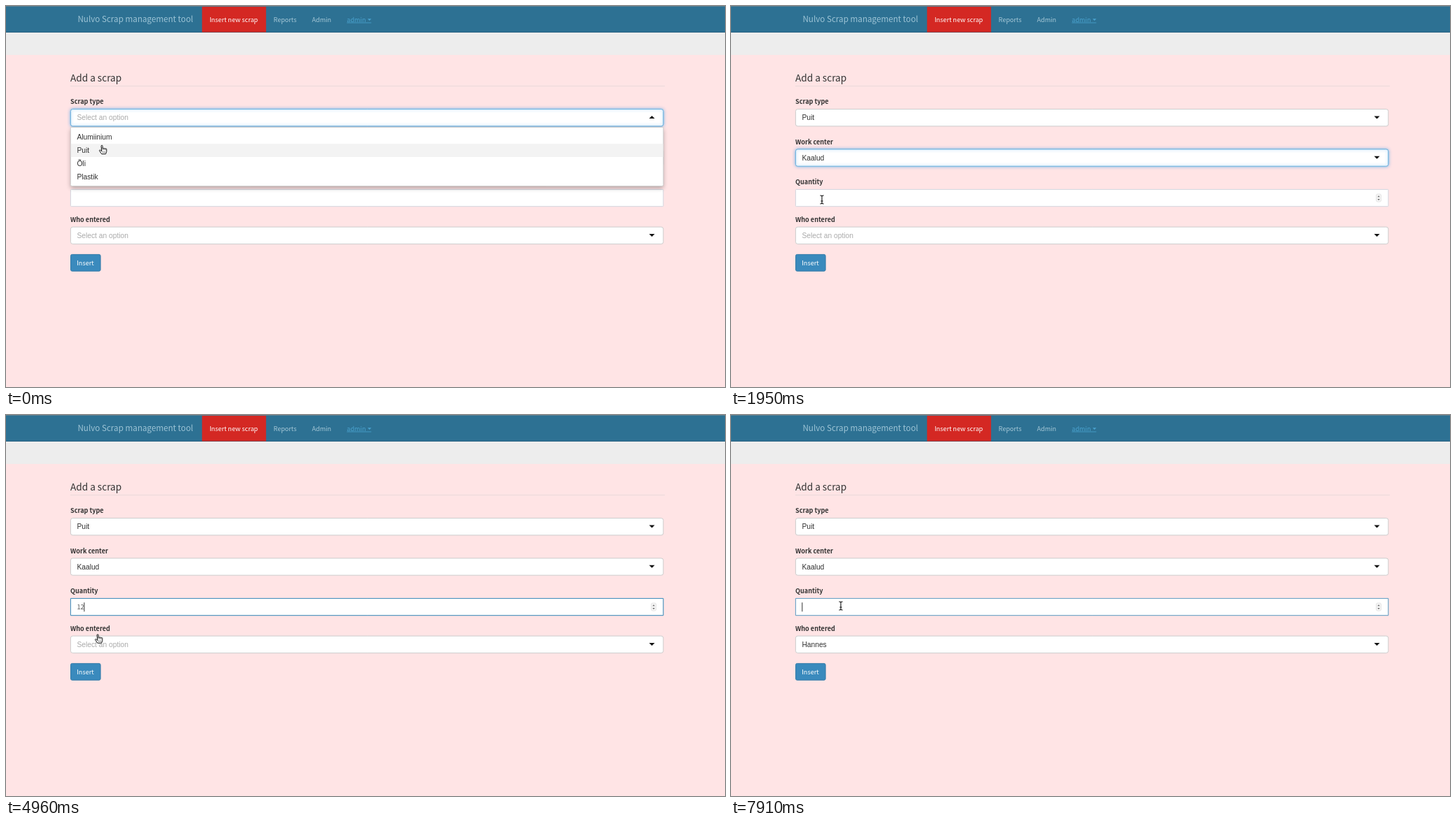
Animation, 1028 px wide and 545 px high, one loop 8 s. Source, as an HTML page with a canvas:

```html
<!DOCTYPE html>
<html lang="en">
<head>
<meta charset="utf-8">
<title>Add a scrap</title>
<style>
html, body { margin: 0; width: 100%; height: 100%; overflow: hidden; background: #ffe4e5; }
canvas { display: block; width: 1028px; height: 545px; }
</style>
</head>
<body>
<canvas id="stage"></canvas>
<script>
const W = 1028, H = 545, LOOP = 8000;
const LEFT = 92.4, WIDTH = 847.4, FIELD_H = 24.3, ROW = 18.85;
const canvas = document.getElementById('stage');
const ctx = canvas.getContext('2d');
const dpr = window.devicePixelRatio || 1;
canvas.width = W * dpr;
canvas.height = H * dpr;

const SANS = '"Noto Sans CJK JP", "Noto Sans CJK SC", "Noto Sans CJK", "Open Sans", sans-serif';
const ARIAL = '"Liberation Sans", Arial, sans-serif';

const fields = {
  type: { label: 'Scrap type', y: 147.6, options: ['Alumiinium', 'Puit', 'Õli', 'Plastik'] },
  work: { label: 'Work center', y: 204.9, options: ['Liin23', 'Liin-21', 'Kaalud', 'Mõõtmine', 'Painutus'] },
  qty: { label: 'Quantity', y: 262.4 },
  who: { label: 'Who entered', y: 316.1, options: ['Rauno', 'Hannes', 'Raivo'] }
};

// Each step holds until the next one; only changed properties are listed.
const steps = [
  [0, { type: '', work: '', qty: '', who: '', focus: { type: 1 }, open: 'type', hover: 1,
        caret: 0, spin: 0, hint: 0, press: 0, cursor: ['hand', 139, 205.5] }],
  [140, { caret: 1, cursor: ['hand', 139.5, 206] }],
  [410, { type: 'Puit', open: '', caret: 0 }],
  [710, { cursor: ['hand', 138, 209] }],
  [860, { cursor: ['hand', 136, 216] }],
  [1010, { focus: { type: .4, work: .6 }, open: 'work', hover: 0, caret: 1, cursor: ['beam', 134.5, 222] }],
  [1190, { focus: { work: 1 }, cursor: ['beam', 134.5, 227] }],
  [1340, { cursor: ['hand', 133, 244] }],
  [1500, { hover: 1, cursor: ['hand', 132, 264] }],
  [1660, { hover: 2, cursor: ['hand', 131, 279] }],
  [1810, { work: 'Kaalud', open: '', caret: 0, cursor: ['hand', 131, 279] }],
  [1950, { spin: 1, cursor: ['beam', 130, 277] }],
  [2550, { cursor: ['beam', 130, 278] }],
  [2690, { cursor: ['beam', 130, 279.5] }],
  [3320, { focus: { work: .5, qty: .5 }, caret: 1 }],
  [3470, { focus: { qty: 1 } }],
  [3770, { qty: '1', hint: 1 }],
  [4220, { qty: '12', hint: 0 }],
  [4370, { cursor: ['beam', 130, 282] }],
  [4520, { cursor: ['arrow', 131, 290] }],
  [4670, { cursor: ['arrow', 132, 304] }],
  [4830, { cursor: ['hand', 133, 320] }],
  [4980, { cursor: ['hand', 133, 327] }],
  [5130, { focus: { qty: .4, who: .6 }, open: 'who', hover: 0, spin: 0, cursor: ['beam', 133, 329] }],
  [5280, { focus: { who: 1 }, cursor: ['beam', 133, 334] }],
  [5430, { cursor: ['arrow', 135, 354] }],
  [5610, { hover: 1, cursor: ['arrow', 136, 376.5] }],
  [5760, { who: 'Hannes', open: '', caret: 0 }],
  [5900, { cursor: ['arrow', 133, 381] }],
  [6050, { cursor: ['arrow', 128, 383] }],
  [6200, { cursor: ['arrow', 124, 382] }],
  [6370, { qty: '', focus: { who: .4 }, press: 1, cursor: ['hand', 121, 373] }],
  [6520, { focus: {}, press: 0, cursor: ['arrow', 158, 250] }],
  [6660, { cursor: ['hand', 177, 157] }],
  [6840, { cursor: ['hand', 176, 160] }],
  [6980, { cursor: ['arrow', 173, 180] }],
  [7130, { cursor: ['hand', 168, 212] }],
  [7280, { cursor: ['arrow', 163, 233] }],
  [7430, { cursor: ['arrow', 159, 250] }],
  [7580, { spin: 1, cursor: ['beam', 157, 269] }],
  [7730, { cursor: ['beam', 157, 273] }],
  [7910, { focus: { qty: .75 }, caret: 1 }]
];

function stateAt(time) {
  const state = {};
  for (const [start, change] of steps) {
    if (start > time) break;
    Object.assign(state, change);
  }
  return state;
}

function text(str, x, y, size, color, family = SANS, weight = 400) {
  ctx.font = `${weight} ${size}px ${family}`;
  ctx.fillStyle = color;
  ctx.fillText(str, x, y);
}

function rect(x, y, w, h, color) {
  ctx.fillStyle = color;
  ctx.fillRect(x, y, w, h);
}

function box(x, y, w, h, r, fill, line) {
  ctx.beginPath();
  ctx.roundRect(x, y, w, h, r);
  if (fill) {
    ctx.fillStyle = fill;
    ctx.fill();
  }
  if (line) {
    ctx.strokeStyle = line;
    ctx.lineWidth = 1;
    ctx.stroke();
  }
}

// dir 1 points down, -1 points up
function triangle(x, y, half, height, dir, color) {
  ctx.beginPath();
  ctx.moveTo(x - half, y - dir * height / 2);
  ctx.lineTo(x + half, y - dir * height / 2);
  ctx.lineTo(x, y + dir * height / 2);
  ctx.fillStyle = color;
  ctx.fill();
}

function glow(color, blur, dy, draw) {
  ctx.save();
  ctx.shadowColor = color;
  ctx.shadowBlur = blur * dpr;
  ctx.shadowOffsetY = dy * dpr;
  draw();
  ctx.restore();
}

function navbar() {
  rect(0, 0, W, 38, '#2d7193');
  rect(0, 0, W, 1, '#5d7f90');
  rect(0, 37, W, 1, '#2a6483');
  rect(0, 38, W, 32, '#ededed');
  rect(280.3, 1, 91.5, 36.5, '#d42823');
  text('Nulvo Scrap management tool', 102.4, 23.4, 11.68, '#9cc3d5');
  text('Insert new scrap', 290.9, 22.6, 9.09, '#ffffff');
  text('Reports', 382.5, 22.6, 9.09, '#a6c8d7');
  text('Admin', 437.5, 22.6, 9.09, '#a6c8d7');
  text('admin', 487.3, 22.6, 9.09, '#4aa3cf');
  rect(487.3, 23.6, 35, .8, '#4aa3cf');
  triangle(519.7, 19.6, 2.7, 2.8, 1, '#4aa3cf');
}

function selectField(name, state) {
  const { y } = fields[name], focus = state.focus[name] || 0, open = state.open === name;
  box(LEFT, y, WIDTH, FIELD_H, 3, '#fff', '#cccccc');
  if (focus) {
    ctx.save();
    ctx.globalAlpha = focus;
    glow('rgba(82,168,236,.75)', 4, 0, () => box(LEFT, y, WIDTH, FIELD_H, 3, '#fff', '#6cb2e0'));
    ctx.restore();
  }
  const value = state[name];
  text(value || 'Select an option', 101.4, y + 15.8, 10.25, value ? '#303030' : '#aaaaaa', ARIAL);
  if (open && state.caret) rect(101.2, y + 6, 1, 12.5, '#444');
  triangle(923.5, y + (open ? 11.3 : 11.9), 4, 4, open ? -1 : 1, '#111');
}

function quantityField(state) {
  const { y } = fields.qty, focus = state.focus.qty || 0;
  box(LEFT, y, WIDTH, FIELD_H, 1, '#fff', '#d2d6de');
  if (focus) {
    ctx.save();
    ctx.globalAlpha = focus;
    box(LEFT, y, WIDTH, FIELD_H, 0, null, '#3c8dbc');
    ctx.restore();
  }
  text(state.qty, 101.4, y + 15.7, 9.09, '#555');
  if (focus && state.caret) rect(101.3 + ctx.measureText(state.qty).width, y + 5.8, 1, 13, '#333');
  if (state.spin) {
    box(922.5, y + 6.6, 7, 11, 2, '#f4f4f4', '#e6e6e6');
    triangle(926, y + 9.8, 1.7, 2, -1, '#666');
    triangle(926, y + 14.6, 1.7, 2, 1, '#666');
  }
}

function dropdown(name, hover) {
  const { y, options } = fields[name];
  const first = y + 40.1, top = y + 26;
  const bottom = first + (options.length - 1) * ROW + 13.3;
  glow('rgba(0,0,0,.3)', 6, 3, () => box(LEFT, top, WIDTH, bottom - top, [0, 0, 2, 2], '#fff'));
  box(LEFT, top, WIDTH, bottom - top, [0, 0, 2, 2], '#fff', '#cfcfcf');
  options.forEach((option, i) => {
    const cy = first + i * ROW;
    if (i === hover) rect(LEFT + .5, cy - ROW / 2, WIDTH - 1, ROW, '#f3f3f3');
    text(option, 101.4, cy + 3.7, 10.25, '#303030', ARIAL);
  });
}

function hint() {
  box(LEFT, 287.3, WIDTH, 17.9, 0, '#fff', '#b4b4b4');
  text('1', 95.2, 300.3, 10.25, '#000', ARIAL);
}

const handPath = new Path2D('M-2.2 2.6L-3.6 1C-5 -.3 -6 1 -5.2 2L-2.2 6.2H3.6L4.8 2.8V-.6C4.8 -1.9 3 -1.9 2.9 -.8C2.8 -2.3 1 -2.3 .9 -1.2C.8 -2.6 -.8 -2.5 -.9 -1.5V-5.2C-.9 -6.6 -2.9 -6.6 -2.9 -5.2L-2.2 2.6Z');
const knuckles = new Path2D('M-.9 -1.5V.6M.9 -1.2V.8M2.9 -.8V1M-.6 2.5V4.5M1 2.5V4.5M2.6 2.5V4.5');
const arrowPath = new Path2D('M0 0V10.6L2.5 8.3L4.2 12.3L6 11.5L4.3 7.6H7.6Z');
const beamPath = new Path2D('M-2.6 -6Q-.5 -6 0 -5Q.5 -6 2.6 -6M0 -5V5M-2.6 6Q-.5 6 0 5Q.5 6 2.6 6M-1.6 2H1.6');

function stroke(path, color, width) {
  ctx.strokeStyle = color;
  ctx.lineWidth = width;
  ctx.stroke(path);
}

function pointer([kind, x, y]) {
  ctx.save();
  ctx.translate(x, y);
  ctx.lineJoin = 'round';
  if (kind === 'hand') {
    ctx.fillStyle = '#fff';
    ctx.fill(handPath);
    stroke(handPath, '#111', 1);
    stroke(knuckles, '#333', .6);
  } else if (kind === 'arrow') {
    stroke(arrowPath, '#fff', 1.8);
    ctx.fillStyle = '#000';
    ctx.fill(arrowPath);
  } else {
    stroke(beamPath, 'rgba(255,255,255,.8)', 2.2);
    stroke(beamPath, '#111', 1.1);
  }
  ctx.restore();
}

function render(time) {
  const state = stateAt(time);
  ctx.setTransform(dpr, 0, 0, dpr, 0, 0);
  rect(0, 0, W, H, '#ffe4e5');
  navbar();
  text('Add a scrap', 91.9, 108.2, 13.63, '#333');
  rect(92, 114, 850, 1, '#eadada');
  for (const name in fields) {
    const { label, y } = fields[name];
    text(label, 92, y - 7.2, 9.09, '#333', SANS, 700);
    if (name === 'qty') quantityField(state);
    else selectField(name, state);
  }
  box(92.5, 355.4, 42.6, 23.8, 2, state.press ? '#3071a3' : '#3a8abd', '#347ca9');
  text('Insert', 101.2, 370.9, 9.09, '#fff');
  if (state.open) dropdown(state.open, state.hover);
  if (state.hint) hint();
  pointer(state.cursor);
}

const began = performance.now();
function tick() {
  render((performance.now() - began) % LOOP);
  requestAnimationFrame(tick);
}
tick();
</script>
</body>
</html>
```
